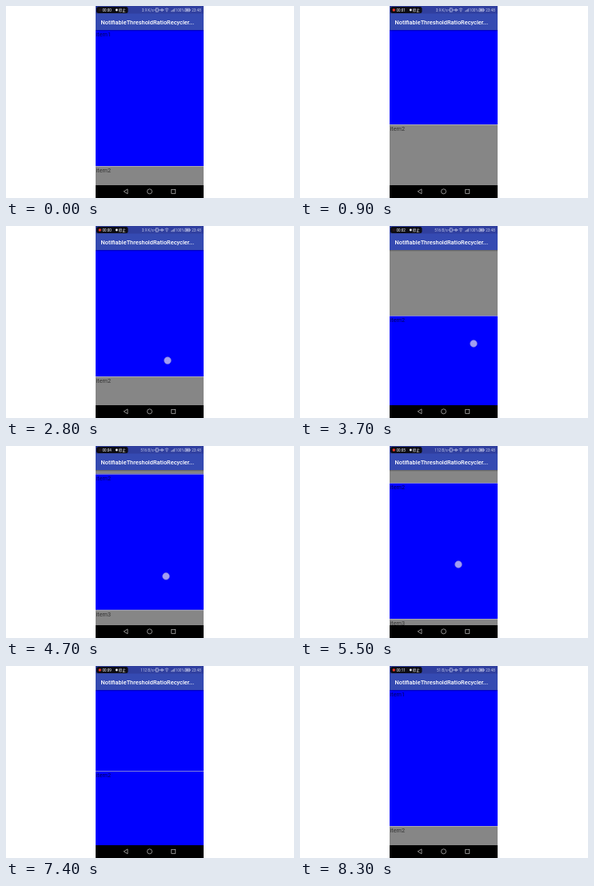
Write an HTML page that moves like this. It is 360x240 px and loops after 8.4 s.

```html
<!DOCTYPE html>
<html lang="en">
<head>
<meta charset="utf-8">
<title>Scroll ratio demo</title>
<style>
html, body { margin: 0; width: 100%; height: 100%; overflow: hidden; background: #fff; }
svg { display: block; width: 100vw; height: 100vh; }
text { font-family: Roboto, "Noto Sans CJK SC", "Noto Sans CJK", sans-serif; }
.status { font-size: 4.7px; fill: #c3c9ea; }
.rec { font-size: 4.5px; fill: #fff; }
.label { font-size: 7.3px; fill: #000; fill-opacity: .62; }
.line { fill: none; stroke: #c3c9ea; stroke-width: .7; }
.nav { fill: none; stroke: #c8c8c8; stroke-width: .7; }
</style>
</head>
<body>
<svg viewBox="0 0 360 240">
  <defs>
    <clipPath id="view"><rect x="112" y="30" width="135" height="194"/></clipPath>
    <linearGradient id="shade" x2="0" y2="1">
      <stop stop-color="#000" stop-opacity=".3"/>
      <stop offset="1" stop-color="#000" stop-opacity="0"/>
    </linearGradient>
  </defs>
  <rect width="360" height="240" fill="#fff"/>
  <g id="list" clip-path="url(#view)"></g>
  <rect x="112" y="30" width="135" height="2" fill="url(#shade)"/>

  <g id="touch">
    <circle r="4.3" fill="#d5d0f5" fill-opacity=".75" stroke="#8c88c8" stroke-opacity=".7" stroke-width=".8"/>
    <circle r="2" fill="#a9a4e0" fill-opacity=".5"/>
  </g>

  <rect x="112" y="9" width="135" height="21" fill="#354ab2"/>
  <text x="118.5" y="22.6" font-size="7.4" font-weight="500" fill="#fff">NotifiableThresholdRatioRecycler...</text>

  <rect x="112" width="135" height="9.5" fill="#303f9f"/>
  <rect x="113" y="1" width="39.5" height="8" rx="2.5" fill="#0c0c14"/>
  <circle id="dot" cx="117.3" cy="5" r="1.7"/>
  <text id="clock" class="rec" x="120.6" y="6.7"></text>
  <circle cx="138.3" cy="5" r="1.4" fill="#fff"/>
  <text class="rec" x="140.8" y="6.7">停止</text>

  <text id="speed" class="status" x="184.6" y="6.7" text-anchor="end"></text>
  <rect class="line" x="187.3" y="2.9" width="2.8" height="4.2"/>
  <path class="line" d="M186 4v2M191.4 4v2"/>
  <path class="line" d="M192.8 5q2.2-3 4.4 0q-2.2 3-4.4 0z"/>
  <circle cx="195" cy="5" r=".8" fill="#c3c9ea"/>
  <path class="line" d="M198.7 4q2.3-2.2 4.6 0M199.7 5.4q1.3-1.2 2.6 0"/>
  <circle cx="201" cy="6.7" r=".6" fill="#c3c9ea"/>
  <path class="line" d="M206.8 7.2v-1.3M208 7.2v-2.2M209.2 7.2v-3.2M210.4 7.2v-4.2"/>
  <text class="status" x="211.6" y="6.7">100%</text>
  <rect class="line" x="224" y="3.2" width="5.6" height="3.6"/>
  <path d="M225 4.2h3.6v1.6h-3.6zM229.9 4.3h.8v1.4h-.8z" fill="#c3c9ea"/>
  <text class="status" x="232.2" y="6.7">23:48</text>

  <rect x="112" y="224" width="135" height="16" fill="#000"/>
  <path class="nav" d="M147.2 231.8l4.8-2.9v5.8z"/>
  <circle class="nav" cx="179.5" cy="231.8" r="3"/>
  <rect class="nav" x="206.8" y="229.3" width="5" height="5"/>
</svg>
<script>
const LOOP = 8400, STEP = 100, RESTART = 2430, RATE = 1.9;
const TOP = 30, BOTTOM = 224, PITCH = 170, FADE = 0.3;

// Drags in recording seconds: start, end, x, y from, y to
const drags = [
  [0.39, 1.4, 202, 180, 128],
  [1.9, 2.7, 217, 183, 132],
  [3.1, 3.7, 204, 175, 130],
  [3.95, 4.51, 200, 180, 156],
  [5.4, 6.4, 198, 130, 175],
  [6.9, 7.9, 192, 153, 183],
  [8.5, 9.1, 196, 150, 178],
  [9.65, 10.15, 196, 135, 172],
  [10.35, 10.8, 195, 131, 163]
];
const speeds = [[11, "51 B/s"], [5, "112 B/s"], [2, "516 B/s"], [0, "3.9 K/s"]];

const $ = id => document.getElementById(id);
const clamp = x => Math.min(1, Math.max(0, x));
const smooth = p => p * p * (3 - 2 * p);

function add(parent, tag, attrs) {
  const el = document.createElementNS("http://www.w3.org/2000/svg", tag);
  for (const k in attrs) el.setAttribute(k, attrs[k]);
  return parent.appendChild(el);
}

const items = [1, 2, 3].map(n => {
  const g = add($("list"), "g", {});
  const back = add(g, "rect", { x: 112, width: 135, height: PITCH + 0.5 });
  if (n > 1) add(g, "rect", { x: 112, width: 135, height: 0.9, fill: "#bcbcc8", "fill-opacity": 0.75 });
  add(g, "text", { x: 112.5, y: 8.3, class: "label" }).textContent = "item" + n;
  return { g, back };
});

function draw(time) {
  const t = Math.floor(time % LOOP / STEP) * STEP;
  const sec = RATE * (t < RESTART ? t : t - RESTART) / 1000;

  let scroll = 0, touch = null;
  for (const [start, end, x, from, to] of drags) {
    if (sec < start) break;
    const moved = (to - from) * smooth(clamp((sec - start) / (end - start)));
    scroll -= moved;
    touch = { x, y: from + moved, alpha: clamp(1 - (sec - end) / FADE) };
  }

  items.forEach(({ g, back }, i) => {
    const y = TOP + i * PITCH - scroll;
    const seen = Math.min(BOTTOM, y + PITCH) - Math.max(TOP, y);
    g.setAttribute("transform", `translate(0 ${y.toFixed(2)})`);
    back.setAttribute("fill", seen / PITCH >= 0.5 ? "#0000ff" : "#868686");
  });

  $("touch").setAttribute("opacity", touch ? touch.alpha : 0);
  if (touch) $("touch").setAttribute("transform", `translate(${touch.x} ${touch.y})`);

  $("dot").setAttribute("fill", sec % 2 < 0.5 ? "#2a1418" : "#f0341c");
  $("clock").textContent = "00:" + String(Math.floor(sec)).padStart(2, "0");
  $("speed").textContent = speeds.find(([from]) => sec >= from)[1];
}

let origin;
function tick(now) {
  origin ??= now;
  draw(now - origin);
  requestAnimationFrame(tick);
}
draw(0);
requestAnimationFrame(tick);
</script>
</body>
</html>
```
